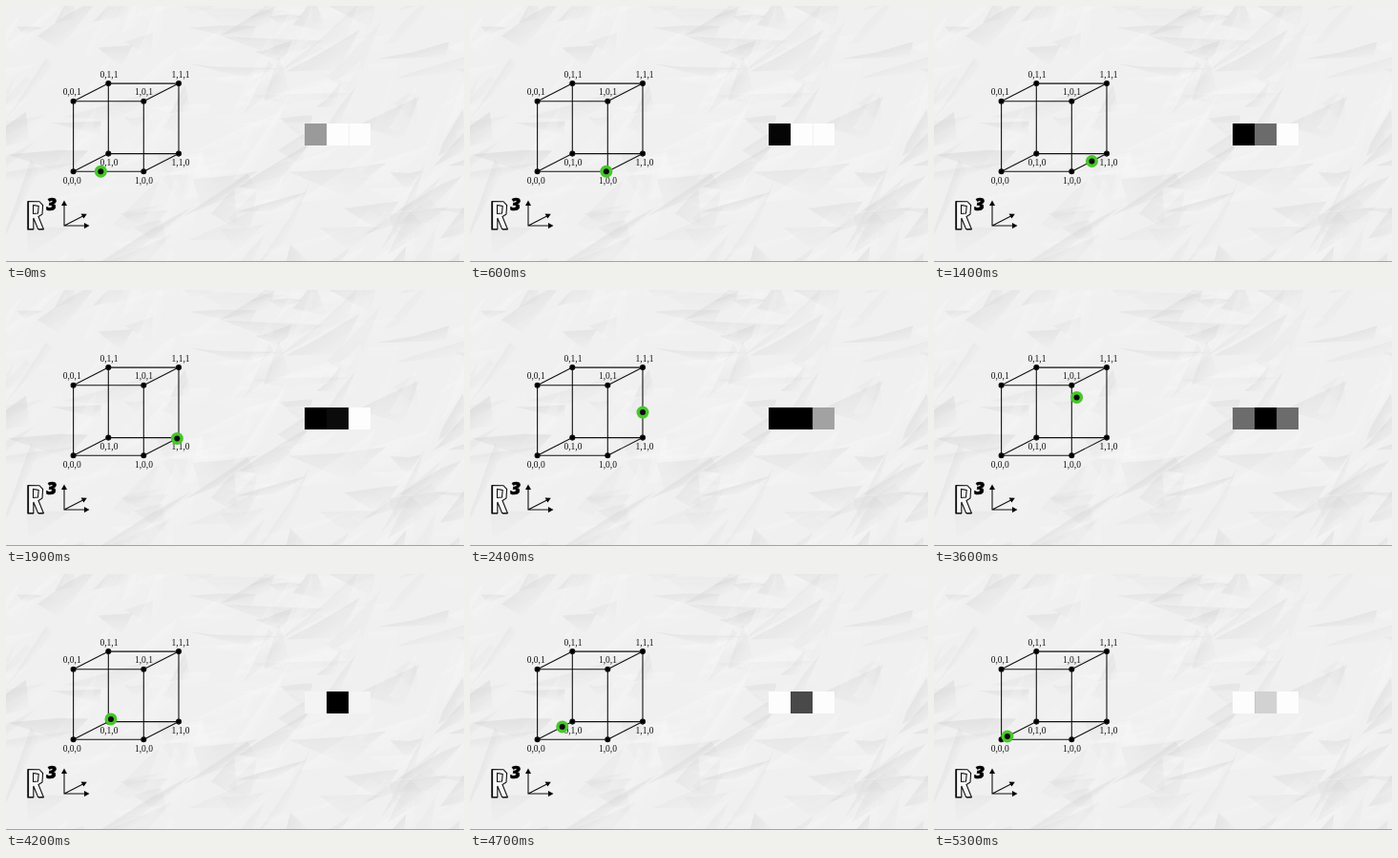
An HTML page with a canvas for the animation above (5.4 s loop, 480 px wide and 268 px high).

```html
<!DOCTYPE html>
<html>
<head>
<meta charset="utf-8">
<title>Path through a cube</title>
<style>
  html, body { margin: 0; width: 480px; height: 268px; overflow: hidden; background: #f0f0f0; }
  canvas, svg { position: absolute; left: 0; top: 0; }
  .label { font: 9.5px "Liberation Serif", serif; text-anchor: middle; }
  .power { font: italic 800 18px "Open Sans", sans-serif; stroke: #000; stroke-width: .7; }
</style>
</head>
<body>
<canvas id="paper" width="480" height="268"></canvas>
<svg id="stage" width="480" height="268" viewBox="0 0 480 268">
  <path d="M0 267.5H480" stroke="#a3a3a3"/>
  <g id="cube" stroke="#111" stroke-width="1.1"></g>
  <g id="labels" fill="#111"></g>
  <g id="cells"></g>
  <g stroke="#111" stroke-width="1.1" fill="#f8f8f8" fill-rule="evenodd">
    <path d="M23 204.5L35 204.7L38.6 208.5L38 218L34 220.5L39.3 233.5H33.6L28.8 222V233.5H23ZM28.5 208.5V217.5L33.5 217L34.2 209.5Z"/>
    <path d="M23.3 205V233.8H29M34 233.8H39.4" fill="none" stroke-width="1.6"/>
  </g>
  <text class="power" x="42.5" y="214">3</text>
  <path d="M61 206V230H85M61 230L82 219.2" fill="none" stroke="#111" stroke-width="1.1"/>
  <path d="M61 203.5L64 209H58ZM87.5 230L82 227V233ZM84.8 217.8L81.4 222.6L78.6 217.6Z"/>
  <g id="marker">
    <circle r="6.5" fill="#47c62b"/>
    <circle r="3" fill="#0b0b0b"/>
  </g>
</svg>
<script>
const LOOP = 5400, STEP = 100;
const $ = id => document.getElementById(id);

function add(parent, tag, attrs, text = "") {
  const el = document.createElementNS("http://www.w3.org/2000/svg", tag);
  for (const key in attrs) el.setAttribute(key, attrs[key]);
  el.textContent = text;
  return parent.appendChild(el);
}

// Soft, overlapping facets that read as crumpled paper
function drawPaper() {
  const g = $("paper").getContext("2d");
  let seed = 41;
  const rnd = () => (seed = seed * 16807 % 2147483647) / 2147483647;
  g.fillStyle = "#f0f0f0";
  g.fillRect(0, 0, 480, 268);
  g.filter = "blur(0.7px)";
  for (let i = 0; i < 210; i++) {
    const length = 25 + rnd() * 85, width = 8 + rnd() * 26;
    const tone = rnd() < .5 ? "255,255,255" : "190,190,190";
    const fade = g.createLinearGradient(0, 0, 0, width);
    fade.addColorStop(0, `rgba(${tone},${.08 + rnd() * .18})`);
    fade.addColorStop(1, `rgba(${tone},0)`);
    g.save();
    g.translate(rnd() * 520 - 20, rnd() * 300 - 16);
    g.rotate(-.6 + (rnd() - .5) * 1.3);
    g.fillStyle = fade;
    g.beginPath();
    g.moveTo(-length / 2, 0);
    g.lineTo(length * (rnd() - .5) * .6, (rnd() - .5) * 5);
    g.lineTo(length / 2, 0);
    g.lineTo(length * (rnd() - .5), width);
    g.fill();
    g.restore();
  }
}

const project = ([x, y, z]) => [70.6 + 73.7 * x + 36.7 * y, 173.2 - 18.6 * y - 73.5 * z];

function drawCube() {
  const corners = [...Array(8).keys()].map(i => [i & 1, i >> 1 & 1, i >> 2]);
  corners.forEach((corner, i) => {
    const [x, y] = project(corner);
    for (const bit of [1, 2, 4]) {
      if (i & bit) continue;
      const [x2, y2] = project(corners[i | bit]);
      add($("cube"), "line", { x1: x, y1: y, x2, y2 });
    }
    add($("cube"), "circle", { cx: x, cy: y, r: 2.5 });
    const [cx, cy, cz] = corner;
    add($("labels"), "text", {
      class: "label",
      x: x - 1.4 + 1.5 * cx + 2 * cy,
      y: y + (cz ? -6.5 : 12.5)
    }, corner.join());
  });
}

// Time in ms and cube coordinates; straight, even motion in between
const path = [
  [0, [.39, 0, 0]],
  [620, [1, 0, 0]],
  [640, [1, 0, 0]],
  [1960, [1, 1, 0]],
  [1990, [1, 1, 0]],
  [3125, [1, 1, 1]],
  [4240, [0, 1, 0]],
  [4380, [0, 1, 0]],
  [5490, [0, 0, 0]]
];

function positionAt(time) {
  const next = path.findIndex(([t]) => t > time);
  const [t0, from] = path[next - 1], [t1, to] = path[next];
  return from.map((v, i) => v + (to[i] - v) * (time - t0) / (t1 - t0));
}

drawPaper();
drawCube();
const cells = [0, 1, 2].map(i =>
  add($("cells"), "rect", { x: 313 + 23 * i, y: 123, width: 23, height: 23 }));
add($("cells"), "path", { d: "M336.5 123v23M359.5 123v23", stroke: "#000", opacity: .04 });

function render(now) {
  const time = Math.floor(now % LOOP / STEP) * STEP;
  const point = positionAt(time);
  $("marker").setAttribute("transform", `translate(${project(point)})`);
  cells.forEach((cell, i) => {
    const gray = Math.round(253 * (1 - point[i]));
    cell.setAttribute("fill", `rgb(${gray},${gray},${gray})`);
  });
}

const start = performance.now();
function tick() {
  render(performance.now() - start);
  requestAnimationFrame(tick);
}
tick();
</script>
</body>
</html>
```
